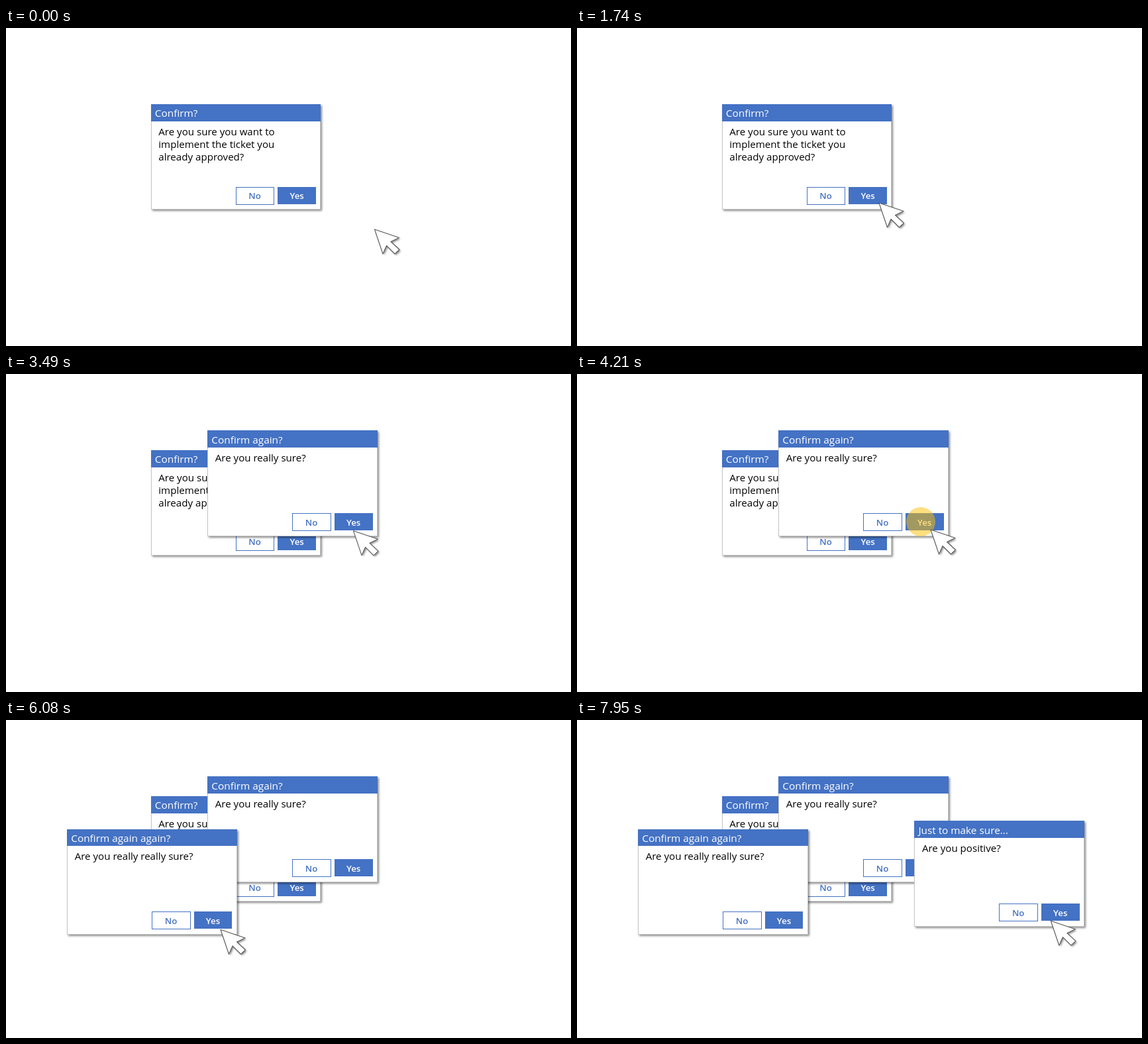
An HTML page with a canvas that plays this animation: 853x480 px, repeating every 8 s.

```html
<!DOCTYPE html>
<html lang="en">
<head>
<meta charset="utf-8">
<title>Confirm?</title>
<style>
  html, body { margin: 0; width: 100%; height: 100%; overflow: hidden; background: #fff; }
  canvas { display: block; }
</style>
</head>
<body>
<canvas id="stage" width="853" height="480"></canvas>
<script>
const ctx = document.getElementById('stage').getContext('2d');
const LOOP = 8000;
const BLUE = '#4472c4';
const TITLE = '15.35px "Open Sans", "Noto Sans", sans-serif';
const TEXT = '15.1px "Open Sans", "Noto Sans", sans-serif';
const LABEL = '600 13.3px "Open Sans", "Noto Sans", sans-serif';

const dialogs = [
  { from: 0, x: 218.8, y: 115.1, title: 'Confirm?',
    lines: ['Are you sure you want to', 'implement the ticket you', 'already approved?'] },
  { from: 2350, x: 304.3, y: 85.4, title: 'Confirm again?', lines: ['Are you really sure?'] },
  { from: 4450, x: 92.2, y: 164.5, title: 'Confirm again again?', lines: ['Are you really really sure?'] },
  { from: 6640, x: 509.4, y: 152.4, title: 'Just to make sure...', lines: ['Are you positive?'] }
];

// Each move takes over at "from" (a hard jump), then travels from a to b, bending towards c.
const TRAVEL = 1240;
const moves = [
  { from: 0, start: 220, a: [556.5, 304], c: [506, 306], b: [456, 264] },
  { from: 2350, start: 2510, a: [450, 251], b: [534, 235] },
  { from: 4450, start: 4610, a: [534, 223], b: [324, 316.5] },
  { from: 6640, start: 6887, a: [324, 307], b: [738, 303] }
];

const clicks = [
  { from: 1920, to: 2300, x: 434, y: 252 },
  { from: 4050, to: 4400, x: 519, y: 223 },
  { from: 6230, to: 6590, x: 307, y: 302 }
];

const arrow = [[0, 0], [37, 12.5], [24.5, 18.5], [37.5, 30.5], [30.5, 37], [18, 24.5], [12.5, 37]];

const clamp = v => Math.max(0, Math.min(1, v));
const ease = v => v * v * (3 - 2 * v);

// Fills a box given by its edges, snapped to whole pixels and optionally inset.
function box(left, top, right, bottom, fill, inset = 0) {
  const [l, t, r, b] = [left, top, right, bottom].map(Math.round);
  ctx.fillStyle = fill;
  ctx.fillRect(l + inset, t + inset, r - l - 2 * inset, b - t - 2 * inset);
}

function text(str, x, y, font, fill, align = 'left') {
  ctx.font = font;
  ctx.fillStyle = fill;
  ctx.textAlign = align;
  ctx.fillText(str, x, Math.round(y));
}

function castShadow(alpha, offset, blur) {
  ctx.shadowColor = `rgba(0,0,0,${alpha})`;
  ctx.shadowOffsetX = ctx.shadowOffsetY = offset;
  ctx.shadowBlur = blur;
}

function drawDialog({ x, y, title, lines }) {
  const frame = [x, y, x + 256.5, y + 159.2];
  ctx.save();
  castShadow(0.45, 2, 3);
  box(...frame, '#c4c4c4');
  ctx.restore();
  box(...frame, '#fff', 1);

  box(x, y, x + 256.5, y + 25.8, BLUE);
  text(title, x + 6, y + 19.3, TITLE, '#fff');
  lines.forEach((line, i) => text(line, x + 11.5, y + 46.8 + 19 * i, TEXT, '#000'));

  const no = [x + 127.9, y + 124.9, x + 186.5, y + 151.8];
  box(...no, BLUE);
  box(...no, '#fff', 1);
  text('No', x + 156.8, y + 143.3, LABEL, BLUE, 'center');
  box(x + 191.5, y + 124.9, x + 249.2, y + 150.9, BLUE);
  text('Yes', x + 220.3, y + 143.3, LABEL, '#fff', 'center');
}

function drawClick({ from, to, x, y }, t) {
  const alpha = 0.5 * clamp((t - from) / 100) * clamp((to - t) / 100);
  if (!alpha) return;
  ctx.fillStyle = `rgba(255,192,0,${alpha})`;
  ctx.beginPath();
  ctx.arc(x, y, 22, 0, 2 * Math.PI);
  ctx.fill();
}

function cursorAt(t) {
  const { start, a, b, c } = moves.filter(m => t >= m.from).pop();
  const s = ease(clamp((t - start) / TRAVEL));
  return a.map((p, i) => {
    const mid = c ? c[i] : (p + b[i]) / 2;
    return (1 - s) * (1 - s) * p + 2 * s * (1 - s) * mid + s * s * b[i];
  });
}

function drawCursor(t) {
  ctx.save();
  ctx.translate(...cursorAt(t));
  ctx.beginPath();
  arrow.forEach(p => ctx.lineTo(...p));
  ctx.closePath();
  ctx.save();
  castShadow(0.45, 2, 3);
  ctx.fillStyle = '#fff';
  ctx.fill();
  ctx.restore();
  ctx.strokeStyle = '#5a5a5a';
  ctx.lineWidth = 1.1;
  ctx.lineJoin = 'round';
  ctx.stroke();
  ctx.restore();
}

function draw(t) {
  box(0, 0, 853, 480, '#fff');
  dialogs.filter(d => t >= d.from).forEach(drawDialog);
  clicks.forEach(c => drawClick(c, t));
  drawCursor(t);
}

const begin = performance.now();
function tick() {
  draw((performance.now() - begin) % LOOP);
  requestAnimationFrame(tick);
}
tick();
</script>
</body>
</html>
```
